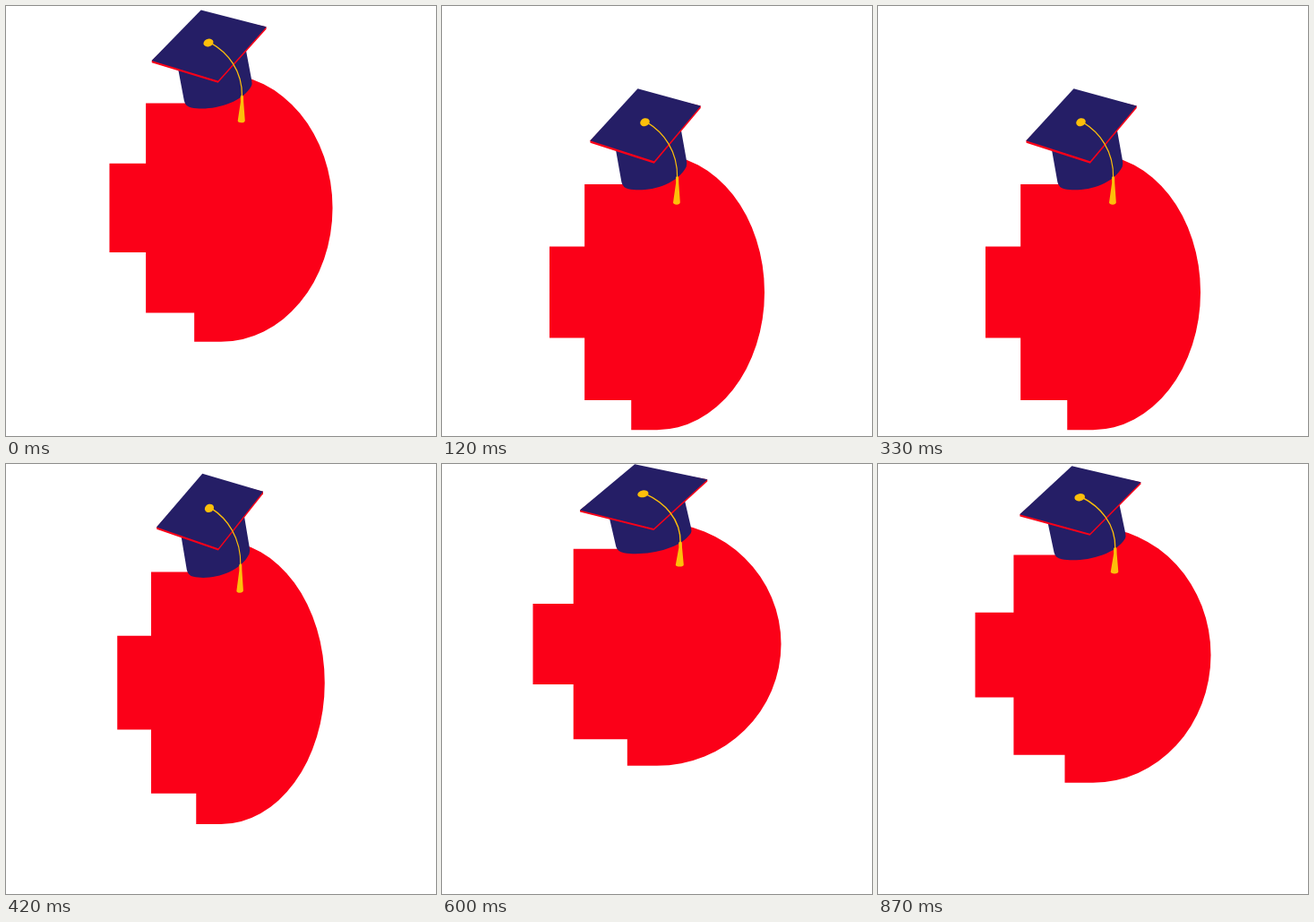
Animation of 480x480 px, one loop 0.9 s. Source, as an HTML page:

```html
<!DOCTYPE html>
<html lang="en">
<head>
<meta charset="utf-8">
<title>Bouncing graduate</title>
<style>
  html, body { margin: 0; width: 100%; height: 100%; overflow: hidden; background: #fff; }
  svg { display: block; width: 100vw; height: 100vh; }
</style>
</head>
<body>
<svg viewBox="0 0 480 480">
  <g id="hero">
    <path fill="#fb0018" d="M0-135A139.4 135 0 0 1 0 135H-33.4V105.7H-93.9V44.8H-139.4V-44.8H-93.9V-105.7H-33.4V-135Z"/>
    <path fill="#251e66" d="M-54-142L-46-108Q-44.300-102.300-37-101.200C-15-97.500 25-104 38-123Q39.200-125 38.300-129L31-160L-4-130Z"/>
    <path fill="#fb0018" d="M-86.500-148.600L-25-197L56.600-182.600V-180.400L-3.700-126.200L-86.500-146.500Z"/>
    <path fill="#251e66" d="M-86.700-148.600L-25-199.600L56.700-182.600L-3.700-128.300Z"/>
    <g fill="#fdbf0a">
      <path fill="none" stroke="#fdbf0a" stroke-width="1.400" d="M-13-166.500C8-157 27-139 26.300-112"/>
      <ellipse rx="6.200" ry="3.900" transform="translate(-15.700 -166.600) rotate(-10)"/>
      <path d="M24.400-112.500Q26.200-115 28-112.500L28.200-107L30-88Q29.600-86 25.500-85.900Q21.200-86 20.900-87.700L24.500-107Z"/>
    </g>
  </g>
</svg>
<script>
  const LOOP = 900, STEP = 30, HALF = 15, APEX = 22.5;
  const hero = document.getElementById('hero');

  // Smooth curve through [x, y] points, flat at both ends.
  function curve(pts) {
    const last = pts.length - 1;
    const rise = i => (pts[i + 1][1] - pts[i][1]) / (pts[i + 1][0] - pts[i][0]);
    const slopes = pts.map((p, i) => {
      if (i === 0 || i === last) return 0;
      const a = rise(i - 1), b = rise(i);
      return a * b <= 0 ? 0 : 2 * a * b / (a + b);
    });
    return x => {
      let i = 0;
      while (i < last - 1 && x > pts[i + 1][0]) i++;
      const [x0, y0] = pts[i], [x1, y1] = pts[i + 1];
      const w = x1 - x0, u = (x - x0) / w, v = 1 - u;
      return v * v * ((1 + 2 * u) * y0 + u * w * slopes[i])
           + u * u * ((3 - 2 * u) * y1 - v * w * slopes[i + 1]);
    };
  }

  // Both run over the steps between the top (0) and the bottom (15) of the bounce.
  const height = curve([[0, 200], [2.5, 201], [6.5, 213.2], [7.5, 225.4],
    [8.5, 244.2], [11.5, 319.5], [14.5, 367.8], [15, 368.3]]);
  const squash = curve([[0, 0], [2.5, -0.0063], [6.5, -0.0565], [7.5, -0.1067],
    [8.5, -0.1695], [9.8, -0.2], [11.5, -0.139], [14.5, 0.1229], [15, 0.126]]);

  function draw(ms) {
    const step = Math.floor((ms % LOOP) / STEP);
    const gap = Math.abs(step - APEX);
    const d = gap > HALF ? 2 * HALF - gap : gap;
    const s = squash(d);
    hero.setAttribute('transform',
      `translate(240 ${height(d).toFixed(2)}) scale(${(1 + s).toFixed(4)} ${(1 - s).toFixed(4)})`);
  }

  let start;
  function tick(now) {
    start ??= now;
    draw(now - start);
    requestAnimationFrame(tick);
  }
  draw(0);
  requestAnimationFrame(tick);
</script>
</body>
</html>
```
